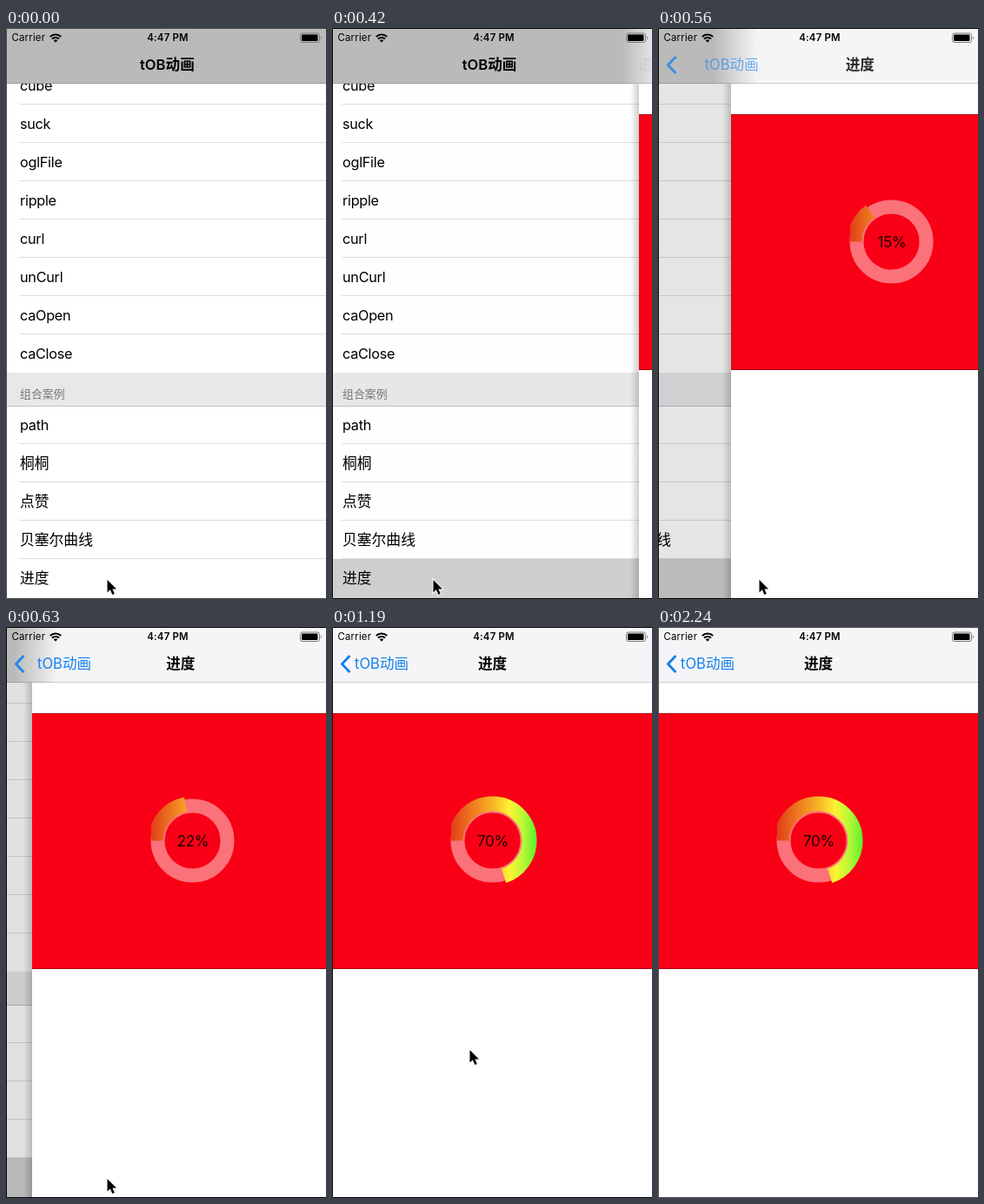
Write an HTML page that moves like this. It is 368 px wide and 656 px high and loops after 2.31 s.

```html
<!DOCTYPE html>
<html lang="zh">
<head>
<meta charset="utf-8">
<title>进度</title>
<style>
  html, body { margin: 0; height: 100%; overflow: hidden; background: #fff; }
  svg { display: block; width: 100vw; height: 100vh; font-family: Inter, "Noto Sans CJK SC", "Noto Sans CJK", "Noto Sans", sans-serif; }
  .row { font-size: 16.3px; letter-spacing: -.3px; }
  .cjk { font-size: 16.8px; letter-spacing: 0; }
  .title { font-size: 16.6px; font-weight: 600; }
  .back { font-size: 16.6px; fill: #1480f0; }
  .small { font-size: 11.4px; letter-spacing: .2px; }
  .mid { text-anchor: middle; }
  .line { stroke: #dededf; }
</style>
</head>
<body>
<svg viewBox="0 0 368 656">
  <defs>
    <linearGradient id="heat" gradientUnits="userSpaceOnUse" x1="136" x2="236">
      <stop offset="0" stop-color="#e03c18"/>
      <stop offset=".28" stop-color="#f0801f"/>
      <stop offset=".5" stop-color="#f8b826"/>
      <stop offset=".68" stop-color="#fdf334"/>
      <stop offset=".83" stop-color="#bdf836"/>
      <stop offset="1" stop-color="#58f22c"/>
    </linearGradient>
    <linearGradient id="barFill" gradientUnits="userSpaceOnUse" x1="0" x2="55">
      <stop offset="0" stop-color="#bababa"/>
      <stop offset="1" stop-color="#f5f5f7"/>
    </linearGradient>
    <linearGradient id="shade">
      <stop offset="0" stop-opacity="0"/>
      <stop offset="1" stop-opacity=".18"/>
    </linearGradient>
    <clipPath id="ringClip"><path d="M137 180h120v114H137z"/></clipPath>
  </defs>

  <rect width="368" height="656" fill="#fff"/>
  <g id="list">
    <rect id="picked" y="610" width="500" height="45" fill="#d0d0d0"/>
    <rect y="396" width="500" height="38" fill="#e8e8ea"/>
    <path d="M0 434.5h500" stroke="#c2c2c4"/>
    <text x="16" y="424.5" font-size="12.9" fill="#77777b">组合案例</text>
  </g>
  <rect id="dim" width="368" height="656"/>

  <g id="page">
    <rect id="edge" x="-10" y="64" width="10" height="592" fill="url(#shade)"/>
    <rect width="369" height="656" fill="#fff"/>
    <rect y="99" width="369" height="294" fill="#f80015"/>
    <path d="M0 99.5h369M0 392.5h369" stroke="#a80c14"/>
    <circle cx="184.5" cy="245.5" r="40" fill="none" stroke="#fc727a" stroke-width="16"/>
    <path id="arc" d="M142 245.5a42.5 42.5 0 0 1 85 0a42.5 42.5 0 0 1-85 0" pathLength="100"
      fill="none" stroke="url(#heat)" stroke-width="17" clip-path="url(#ringClip)"/>
    <text id="label" class="mid" x="185" y="251.5" font-size="17" letter-spacing="-.3" fill="#180003"></text>
  </g>

  <rect width="368" height="64" fill="url(#barFill)"/>
  <path d="M0 63.5h368" stroke="#000" stroke-opacity=".16"/>
  <path id="chevron" d="M20.5 33l-9 9.5 9 9.5" fill="none" stroke="#1480f0" stroke-width="2.8"/>
  <text id="oldTitle" class="title" y="48">tOB动画</text>
  <text id="backText" class="back" y="48">tOB动画</text>
  <text id="newTitle" class="title mid" y="48">进度</text>

  <text class="small" x="6.5" y="15.3">Carrier</text>
  <text class="small mid" x="186" y="15.3" font-weight="600">4:47 PM</text>
  <g fill="none" stroke="#000" stroke-width="2.1">
    <path d="M50.8 10a9 9 0 0 1 12.4 0M53 12.6a5.8 5.8 0 0 1 8 0"/>
    <path d="M57 16.6l-2.2-2.2a3.1 3.1 0 0 1 4.4 0z" fill="#000" stroke="none"/>
  </g>
  <rect x="338.5" y="6" width="22" height="10.5" rx="2.5" fill="none" stroke="#7a7a7a"/>
  <rect x="340" y="7.5" width="18.5" height="7.5" rx="1.3"/>
  <path d="M362 9.3q2 2 0 4z" fill="#7a7a7a"/>

  <path id="frame" d="M368 .5H.5v655H368" fill="none"/>
  <path id="cursor" d="M0 0v14.4l3.3-3.1 2.5 5.7 2.5-1.1-2.4-5.5h4.6z"
    stroke="#fff" stroke-width="2" paint-order="stroke"/>
</svg>

<script>
const LOOP = 2310, STEP = 70, W = 368;
const $ = id => document.getElementById(id);
const clamp = v => Math.min(1, Math.max(0, v));
const span = (v, a, b) => clamp((v - a) / (b - a));
const smooth = v => v * v * (3 - 2 * v);
const set = (id, attrs) => {
  for (const key in attrs) $(id).setAttribute(key, attrs[key]);
};

function add(tag, attrs, text = '') {
  const el = document.createElementNS('http://www.w3.org/2000/svg', tag);
  for (const key in attrs) el.setAttribute(key, attrs[key]);
  el.textContent = text;
  $('list').append(el);
}

function addRows(names, mid) {
  names.forEach((name, i) => {
    const y = mid + 44 * i;
    const cjk = name.charCodeAt(0) > 255;
    add('text', { class: cjk ? 'row cjk' : 'row', x: 16, y: y + 6 }, name);
    if (i < names.length - 1) add('path', { class: 'line', d: `M15 ${y + 21.5}h485` });
  });
}
addRows(['cube', 'suck', 'oglFile', 'ripple', 'curl', 'unCurl', 'caOpen', 'caClose'], 66);
addRows(['path', '桐桐', '点赞', '贝塞尔曲线', '进度'], 456);

// Share of the push still to travel: a critically damped spring.
function remaining(t) {
  if (t < 402.4) return 1;
  const k = .0176 * (t - 402.4);
  const s = (1 + k) * Math.exp(-k);
  return clamp(s - .0095 * (1 - s));
}

function cursorAt(t) {
  if (t < 1470) {
    const a = smooth(span(t, 840, 1190));
    return [116.5 + 42 * a, 634 - 148 * a];
  }
  const b = span(t, 1400, 1610) ** 1.6;
  return [158.5 + 163 * b, 486 + 157 * b];
}

function draw(t) {
  const rem = remaining(t), p = 1 - rem, x = Math.round(W * rem);
  const moving = p > 0 && p < 1;

  set('list', { transform: `translate(${Math.round(-.3 * W * p)})` });
  set('picked', { opacity: t >= 350 ? 1 : 0 });
  set('dim', { opacity: .13 * p });
  set('page', { transform: `translate(${x})`, opacity: p > 0 ? 1 : 0 });
  set('edge', { opacity: moving ? 1 : 0 });

  const blurX = moving ? x : p ? -100 : 500;
  set('barFill', { x1: blurX - 20, x2: blurX + 30 });
  set('chevron', { opacity: p });
  set('oldTitle', { x: 154 - 108 * p, opacity: 1 - span(p, .38, .71) });
  set('backText', { x: 26 + 121 * rem, opacity: span(p, .55, .92) });
  set('newTitle', { x: 184.5 + 187 * rem + 127 * rem * rem * p, opacity: clamp(p * 1.07) });

  const done = Math.min(70, Math.max(0, (t - 402) * .0965));
  set('arc', { 'stroke-dasharray': `${done} 200` });
  $('label').textContent = Math.round(done) + '%';

  set('frame', { stroke: t >= 350 && t < 2100 ? '#000' : '#484848' });
  set('cursor', { transform: `translate(${cursorAt(t)})`, opacity: t < 1680 ? 1 : 0 });
}

function tick() {
  const t = performance.now() % LOOP;
  draw(Math.floor(t / STEP) * STEP);
  requestAnimationFrame(tick);
}
tick();
</script>
</body>
</html>
```
